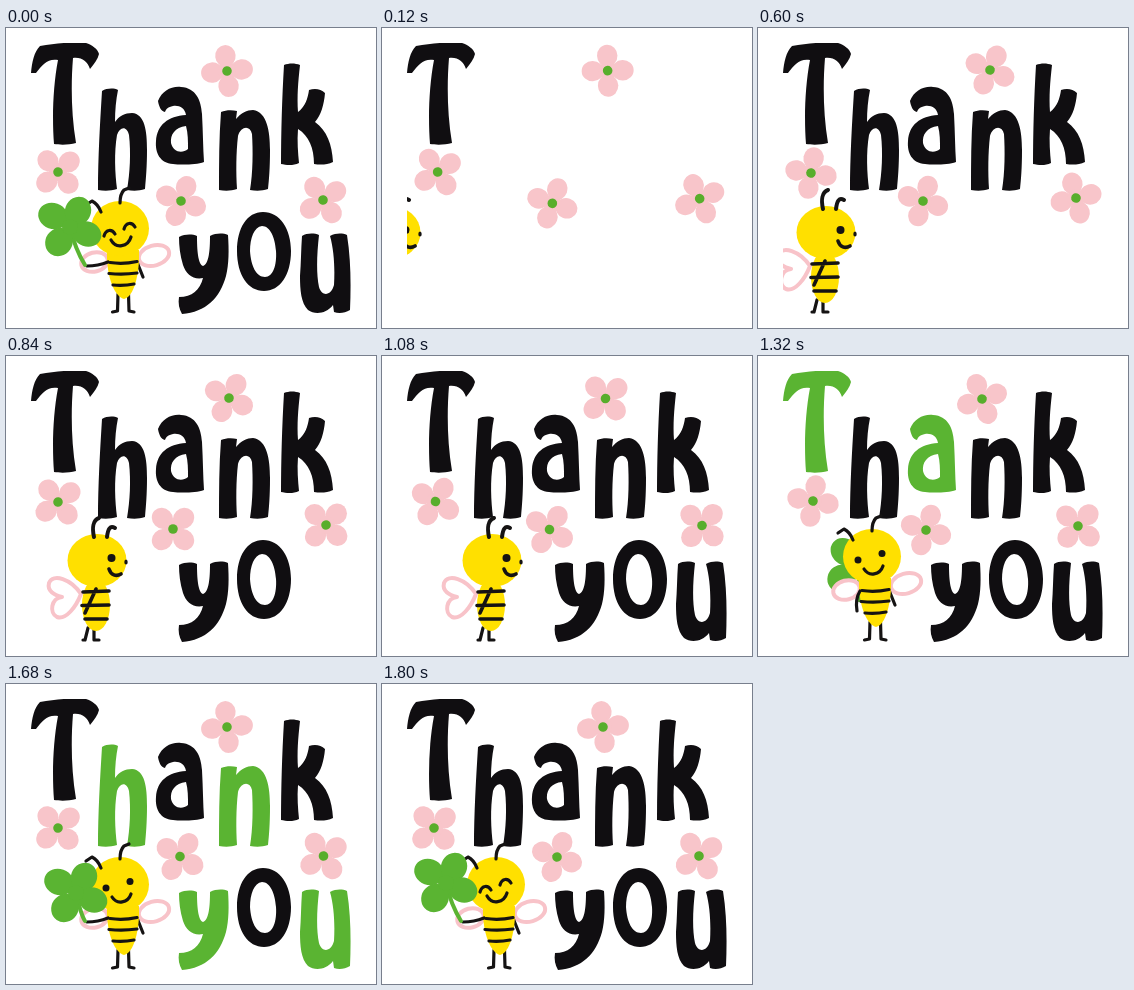
An HTML page that plays this animation: 370 by 300 pixels, repeating every 1.92 s.

```html
<!DOCTYPE html>
<html lang="en">
<head>
<meta charset="utf-8">
<title>Thank you</title>
<style>
html, body { margin: 0; width: 100%; height: 100%; overflow: hidden; background: #fff; }
svg { display: block; width: 370px; height: 300px; }
.ink { fill: none; stroke: #151313; stroke-width: 3.2; stroke-linecap: round; stroke-linejoin: round; }
.wing { fill: #fff; stroke: #f8c3c9; stroke-width: 4; stroke-linecap: round; stroke-linejoin: round; }
.skin { fill: #ffe000; }
.leaf { fill: #5ab432; }
.stalk { fill: none; stroke: #5ab432; stroke-width: 4; stroke-linecap: round; }
</style>
</head>
<body>
<svg viewBox="0 0 370 300" role="img" aria-label="Thank you">
  <defs>
    <clipPath id="stage"><rect x="25" y="15" width="320" height="271"/></clipPath>
    <g id="petals">
      <g fill="#f8c5ca">
        <ellipse cy="-15" rx="10.200" ry="11"/>
        <ellipse cx="15" rx="11" ry="10.200"/>
        <ellipse cy="15" rx="10.200" ry="11"/>
        <ellipse cx="-15" rx="11" ry="10.200"/>
        <circle r="9"/>
      </g>
      <circle r="4.800" fill="#58ae2b"/>
    </g>
    <g id="leaves" class="leaf">
      <ellipse cx="-17" cy="-11" rx="15" ry="13" transform="rotate(20 -17 -11)"/>
      <ellipse cx="8" cy="-16" rx="13" ry="14.500" transform="rotate(20 8 -16)"/>
      <ellipse cx="17" cy="7" rx="14.500" ry="12.500" transform="rotate(20 17 7)"/>
      <ellipse cx="-11" cy="15" rx="13.500" ry="14.500" transform="rotate(35 -11 15)"/>
      <circle r="8"/>
    </g>
  </defs>
  <g clip-path="url(#stage)">
    <g id="word"></g>
    <g id="garden"></g>

    <g id="walker">
      <path class="wing" d="M-17 238C-27 223-45 217-49 227C-51 235-44 239-36 241C-47 242-49 257-41 261C-32 264-22 251-17 238Z"/>
      <path class="ink" id="feet"/>
      <ellipse class="skin" cx="-2" cy="249" rx="14" ry="26"/>
      <ellipse class="skin" cx="-1" cy="204.500" rx="29.500" ry="26.500"/>
      <g class="ink">
        <path d="M-15 236L11 235M-16 249.500L11 249M-13 263L9 263M-2 233L-13 257" stroke-width="3.600"/>
        <path d="M-4 181C-6 172-5 164 1 162M9 181C10 173 12 169 17 172" stroke-width="4"/>
        <path d="M11 213C13 219 18 221 23 218" stroke-width="3.600"/>
      </g>
      <circle cx="13.500" cy="202" r="4" fill="#151313"/>
      <ellipse cx="28" cy="206" rx="1.700" ry="2.500" fill="#151313"/>
    </g>

    <g id="greeter">
      <g id="back"></g>
      <ellipse class="wing" cx="88.500" cy="234" rx="13.500" ry="9.500" transform="rotate(-14 88.500 234)"/>
      <ellipse class="wing" cx="148" cy="227.500" rx="15.500" ry="10" transform="rotate(-16 148 227.500)"/>
      <path class="ink" d="M112 266L111.500 283L106.500 284M122.500 266L123 283L128 284" stroke-width="2.600"/>
      <path class="ink" d="M131 234L137 249" stroke-width="2.600"/>
      <path class="skin" d="M101 222C100 245 107 268 118 271C128 269 134 245 133 222Z"/>
      <ellipse class="skin" cx="114" cy="200.500" rx="29" ry="27.500"/>
      <path class="ink" d="M104 234.500Q117 236.500 131 233.500M103 245.500Q117 247 131 245M107 257Q118 258 128 256" stroke-width="4.200"/>
      <path class="ink" d="M95 184Q92 176 86 173L80 177M114 175Q114 166 118 162L123 160"/>
      <g id="awake">
        <circle cx="100" cy="204" r="3.500" fill="#151313"/>
        <circle cx="124" cy="197.500" r="3.500" fill="#151313"/>
        <path class="ink" d="M106 213C111 221 122 219 125 210" stroke-width="2.800"/>
      </g>
      <g id="happy" class="ink" stroke-width="2.800">
        <path d="M98 208C100 201 106 201 109 206M118 201C120 194 126 194 129 199"/>
        <path d="M105 212C110 221 122 219 125 209"/>
      </g>
      <path class="ink" id="arm" stroke-width="2.600"/>
      <g id="front"></g>
    </g>
  </g>
</svg>
<script>
const $ = id => document.getElementById(id);
const STEP = 120, COUNT = 16;
const BLACK = '#100e11', GREEN = '#5ab432';

const glyphs = [
  // T
  'M25 45C26 34 28 24 34 18C50 15 66 14 80 15C86 17 92 21 93 26C92 31 88 36 84 41C81 33 76 29 67 30C65 55 65 85 70 115C63 117 54 117 48 116C46 90 47 58 52 32C42 30 36 37 30 45Z',
  // h
  'M96 63C101 60 108 60 112 62C110 72 109 82 109 94C113 88 119 85 126 85C139 86 141 103 141 122C141 138 140 150 139 161C133 163 127 163 121 162C124 145 125 125 123 107C121 98 114 98 111 107C108 125 109 145 111 161C105 163 98 163 92 162C92 130 94 95 96 63Z',
  // a
  'M152 73C156 63 165 58 175 59C190 60 195 72 196 86C197 104 197 120 198 134C190 137 174 137 167 136C154 135 149 125 150 113C151 97 162 88 180 87C179 80 173 77 167 78C162 79 160 81 159 84C155 83 153 79 152 73ZM180 98C169 99 164 107 165 115C167 124 176 126 182 121C182 113 182 105 180 98Z',
  // n
  'M215 84C220 82 226 82 231 83L230 91C235 85 241 82 247 82C261 84 264 103 264 122C264 140 263 152 262 161C256 163 250 163 244 162C247 145 247 122 246 106C244 97 235 98 232 108C230 125 230 145 231 161C225 163 219 163 213 162C213 135 213 110 215 84Z',
  // k
  'M278 37C283 35 289 35 294 37C292 55 291 68 292 84C299 79 302 70 303 62C309 60 315 61 319 65C318 77 315 87 309 94C321 103 326 116 327 134C321 137 314 137 308 136C308 120 303 108 292 101C291 113 292 125 293 135C287 138 280 137 275 136C275 105 276 70 278 37Z',
  // y
  'M173 209C179 206 186 206 191 208C191 222 192 236 197 238C203 236 204 222 204 208C210 205 217 205 222 207C223 222 223 236 220 248C214 270 200 284 176 286C173 281 172 275 173 269C186 269 194 262 197 250C187 252 180 246 177 237C174 227 173 218 173 209Z',
  // o
  'M257 184C274 184 285 201 285 223C285 247 274 263 258 263C242 263 231 247 231 223C231 200 241 184 257 184ZM256 198C248 199 244 210 244 223C245 238 250 249 259 249C267 249 271 237 270 223C269 209 264 198 256 198Z',
  // u
  'M296 208C301 205 308 205 313 207C311 225 310 245 313 259C316 269 325 268 328 257C329 240 328 222 324 208C330 205 336 205 341 207C345 232 345 258 344 282C339 285 333 286 328 284L327 277C320 286 309 287 302 282C295 275 294 262 294 248C295 235 295 222 296 208Z'
];

// Each flower: x, y, turn at the steps in swayAt
const swayAt = [0, 3, 5, 7, 11, 13, 15];
const sway = [
  [[221, 43, -6], [235, 42, 7], [232, 42, 25], [223, 42, 28], [224, 43, -20], [221, 43, -6], [221, 43, -6]],
  [[52, 144, -42], [63, 144, -18], [53, 145, 10], [52, 146, -38], [55, 145, 10], [52, 144, -42], [52, 144, -42]],
  [[175, 173, 20], [161, 180, 18], [165, 173, 18], [167, 173, -45], [168, 174, 18], [173, 172, -45], [175, 173, 20]],
  [[317, 172, -34], [319, 168, -4], [318, 170, -14], [320, 169, -46], [320, 170, -48], [318, 172, -34], [317, 172, -34]]
];

const walkX = [0, 10, 26, 40, 55, 69, 81, 92, 102, 111];
// x, y, turn of the clover
const clover = { 11: [99, 212, 20], 12: [86, 216, 10], 13: [76, 220, 0], 14: [70, 209, 0], 15: [64, 199, 0] };

const make = (tag, parent, attrs) => {
  const el = document.createElementNS('http://www.w3.org/2000/svg', tag);
  for (const k in attrs) el.setAttribute(k, attrs[k]);
  return parent.appendChild(el);
};
const show = (el, on) => el.setAttribute('display', on ? 'inline' : 'none');
const place = (el, x, y, turn) => el.setAttribute('transform', `translate(${x} ${y}) rotate(${turn})`);
const mix = (a, b, p) => a + (b - a) * p;

const letters = glyphs.map(d => make('path', $('word'), { d, 'fill-rule': 'evenodd' }));
const flowers = sway.map(() => make('use', $('garden'), { href: '#petals' }));
const sprig = make('g', $('front'), {});
const stalk = make('path', sprig, { class: 'stalk' });
const leaves = make('use', sprig, { href: '#leaves' });

function drawWord(n) {
  const shown = n === 0 ? 8 : Math.min(n, 8);
  letters.forEach((el, i) => {
    const even = n === 11 ? i === 0 || i === 2 : n === 12 && i % 2 === 0;
    const odd = (n === 13 || n === 14) && i % 2 === 1;
    show(el, i < shown);
    el.setAttribute('fill', even || odd ? GREEN : BLACK);
  });
}

function drawFlowers(n) {
  let k = 0;
  while (k < swayAt.length - 2 && n >= swayAt[k + 1]) k++;
  const p = (n - swayAt[k]) / (swayAt[k + 1] - swayAt[k]);
  flowers.forEach((el, i) => {
    const a = sway[i][k], b = sway[i][k + 1];
    // four petals repeat every quarter turn
    const turn = b[2] - a[2] - 90 * Math.round((b[2] - a[2]) / 90);
    place(el, mix(a[0], b[0], p), mix(a[1], b[1], p), a[2] + turn * p);
  });
}

function drawWalker(n) {
  const on = n > 0 && n < walkX.length;
  show($('walker'), on);
  if (!on) return;
  place($('walker'), walkX[n], 0, 0);
  $('feet').setAttribute('d', n % 2
    ? 'M-10 272L-13 284L-15 284M-4 272L-4 284L1 284'
    : 'M-8 272L-9 284L-5 284M-3 272L0 284L3 283');
}

function drawGreeter(n) {
  const on = n === 0 || n >= 10;
  show($('greeter'), on);
  if (!on) return;
  const pose = n || 15, raised = pose >= 14;
  show($('awake'), pose < 15);
  show($('happy'), pose === 15);
  $('arm').setAttribute('d', raised ? 'M102 234Q92 238 81 238' :
    pose === 13 ? 'M102 231L93 255' : 'M102 235Q97 243 99 255');
  show(sprig, pose in clover);
  if (!(pose in clover)) return;
  const [x, y, turn] = clover[pose];
  const [handX, handY] = raised ? [79, 237] : pose === 13 ? [92, 254] : [101, 244];
  $(pose < 13 ? 'back' : 'front').appendChild(sprig);
  place(leaves, x, y, turn);
  stalk.setAttribute('d', `M${x} ${y}Q${x + 5} ${y + 22} ${handX} ${handY}`);
}

function render(ms) {
  const n = Math.floor(ms / STEP) % COUNT;
  drawWord(n);
  drawFlowers(n);
  drawWalker(n);
  drawGreeter(n);
}

let start = null;
function tick(now) {
  if (start === null) start = now;
  render(Math.max(0, now - start));
  requestAnimationFrame(tick);
}
render(0);
requestAnimationFrame(tick);
</script>
</body>
</html>
```
